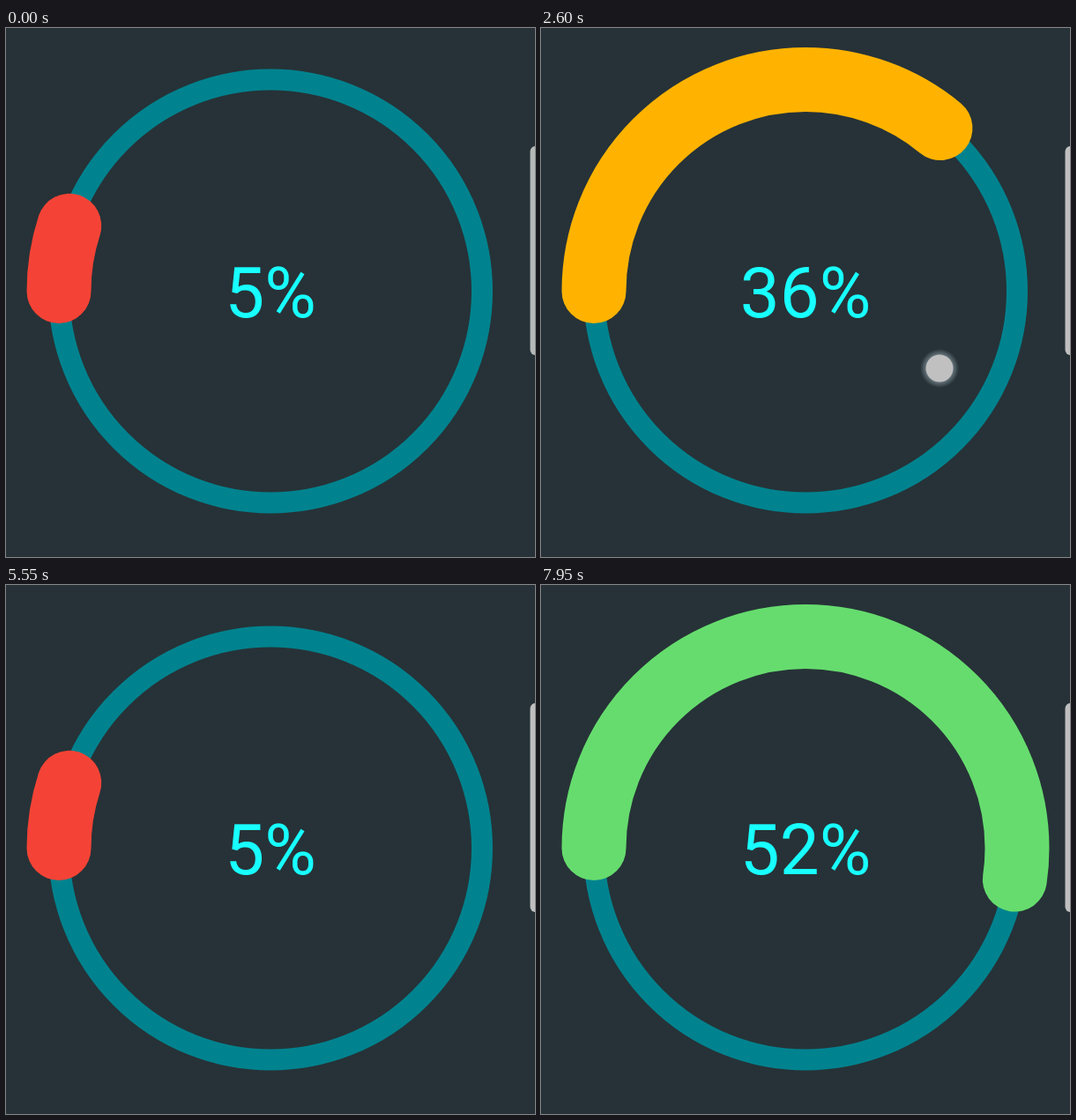
Recreate the animation shown at these times as an HTML page with a canvas. Size 600x600 px, loop 8 s.

```html
<!DOCTYPE html>
<html lang="en">
<head>
<meta charset="utf-8">
<title>Circular progress</title>
<style>
html, body { margin: 0; width: 100%; height: 100%; overflow: hidden; background: #263237; }
canvas { display: block; }
</style>
</head>
<body>
<canvas id="stage" width="600" height="600"></canvas>
<script>
const ctx = document.getElementById('stage').getContext('2d');
const LOOP = 8000, STEP = 50, DURATION = 800, PRESS = 100, DELAY = 87;
const CX = 300, CY = 298.5, RADIUS = 240;
const RED = [244, 67, 54], AMBER = [255, 179, 0], GREEN = [79, 245, 119];

const taps = [
  { at: 150, to: 28, x: 446, y: 386 },
  { at: 1500, to: 36, x: 447, y: 385 },
  { at: 2600, to: 29, x: 452, y: 386 },
  { at: 3600, to: 43, x: 458, y: 388 },
  { at: 4650, to: 5, x: 452, y: 387 },
  { at: 5750, to: 14, x: 437, y: 387 },
  { at: 6700, to: 3, x: 460, y: 388 },
  { at: 7258, to: 60, x: 464, y: 388 }
];

const mix = (a, b, f) => a + (b - a) * f;
const colorFor = value => value < 25 ? RED : value < 50 ? AMBER : GREEN;

// A tap starts easing from whatever value is showing at that moment.
function stateAt(time) {
  let value = 5, color = RED;
  taps.forEach((tap, i) => {
    const start = tap.at + DELAY;
    if (time < start) return;
    const next = taps[i + 1];
    const end = next ? Math.min(time, next.at + DELAY) : time;
    const u = Math.min(1, (end - start) / DURATION);
    const f = (1 - Math.cos(Math.PI * u)) / 2;
    const target = colorFor(tap.to);
    value = mix(value, tap.to, f);
    color = color.map((c, k) => mix(c, target[k], f));
  });
  return { value, color };
}

function arc(from, sweep, width, color) {
  ctx.beginPath();
  ctx.arc(CX, CY, RADIUS, from, from + sweep);
  ctx.lineWidth = width;
  ctx.strokeStyle = color;
  ctx.stroke();
}

function drawTouch(x, y) {
  const glow = ctx.createRadialGradient(x, y, 15, x, y, 22);
  glow.addColorStop(0, 'rgba(150,165,175,0.6)');
  glow.addColorStop(1, 'rgba(150,165,175,0)');
  const disc = (r, fill) => {
    ctx.beginPath();
    ctx.arc(x, y, r, 0, Math.PI * 2);
    ctx.fillStyle = fill;
    ctx.fill();
  };
  disc(22, glow);
  disc(15.5, '#c0c0c1');
}

function draw(time) {
  ctx.fillStyle = '#263237';
  ctx.fillRect(0, 0, 600, 600);

  ctx.fillStyle = time < 150 ? '#b5b9b7' : '#c0bfc0';
  ctx.beginPath();
  ctx.roundRect(594.5, 134, 20, 237, 6);
  ctx.fill();

  const { value, color } = stateAt(time);
  ctx.lineCap = 'butt';
  arc(0, Math.PI * 2, 24, '#00838f');
  ctx.lineCap = 'round';
  arc(Math.PI, value / 100 * Math.PI * 2, 73, `rgb(${color.map(Math.round)})`);

  ctx.font = '80px Roboto, sans-serif';
  ctx.textAlign = 'center';
  ctx.fillStyle = '#18ffff';
  ctx.fillText(Math.floor(value + 1e-6) + '%', CX, 328);

  const touch = taps.find(tap => time >= tap.at && time < tap.at + PRESS);
  if (touch) drawTouch(touch.x, touch.y);
}

const origin = performance.now();
function tick() {
  const elapsed = (performance.now() - origin) % LOOP;
  draw(Math.floor(elapsed / STEP) * STEP);
  requestAnimationFrame(tick);
}
tick();
</script>
</body>
</html>
```
